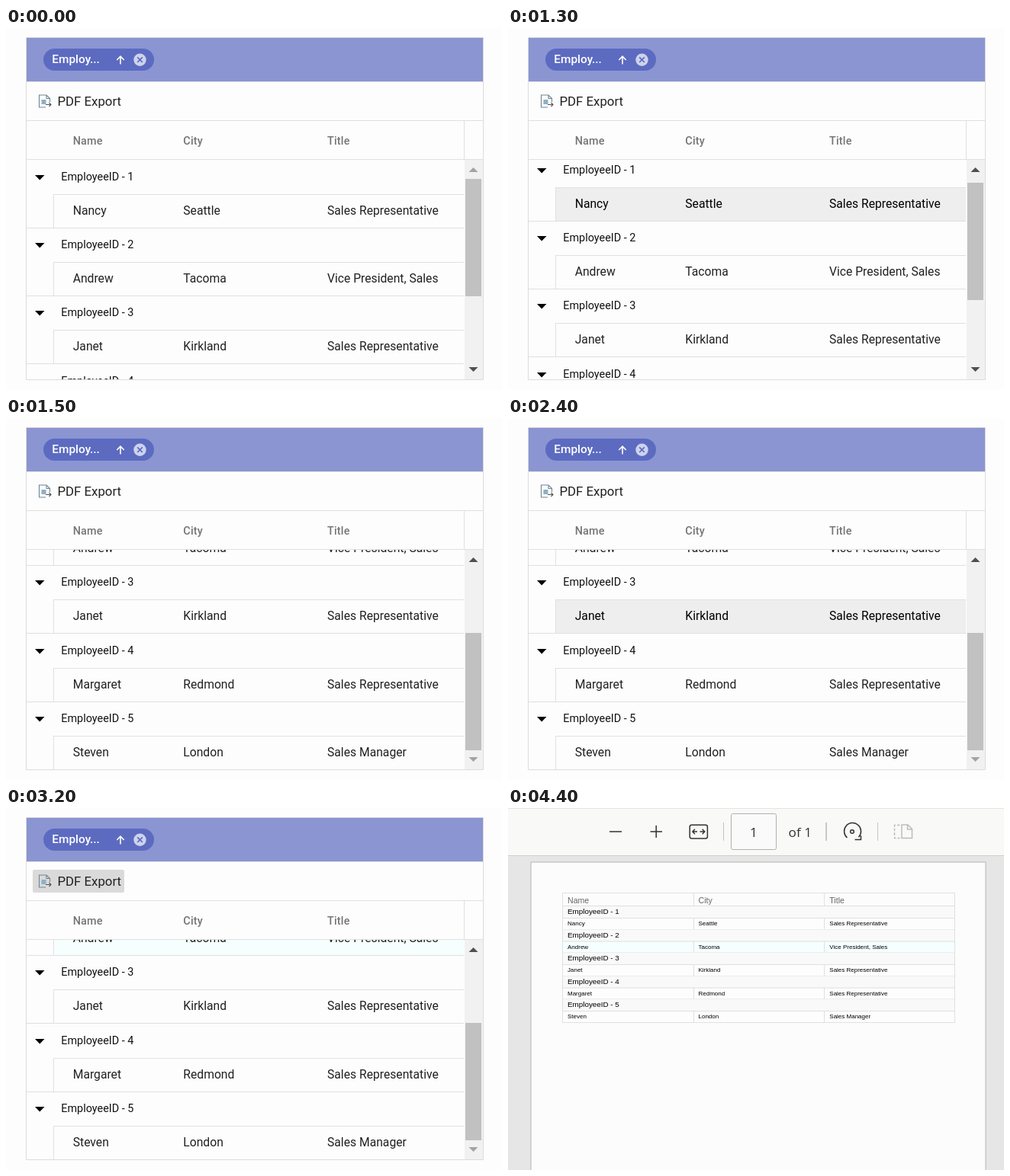
An HTML page for the animation above (6600 ms loop, 650 px wide and 475 px high).

```html
<!DOCTYPE html>
<html lang="en">
<head>
<meta charset="utf-8">
<title>Grid export</title>
<style>
html, body { margin: 0; width: 100%; height: 100%; overflow: hidden; background: #fdfdfd; }
svg { display: block; width: 100%; height: 100%; }
text { font-family: Roboto, sans-serif; white-space: pre; }
.cell { font-size: 15.7px; fill: #212121; }
.caption { font-size: 14.4px; fill: #111; }
.head { font-size: 14.4px; font-weight: 500; letter-spacing: .2px; fill: #757575; }
.tool { font-size: 16.8px; fill: #212121; }
.chip { font-size: 15.4px; font-weight: 500; fill: #fff; }
.hover .cell { fill: #000; }
.viewer text { font-family: "Liberation Sans", Arial, sans-serif; fill: #000; }
.viewer .bar { font: 17.2px "Open Sans", sans-serif; fill: #333; }
.viewer .pdfHead { font-size: 10.6px; fill: #666; }
.viewer .pdfCaption { font-size: 9.85px; }
.viewer .pdfCell { font-size: 8px; }
</style>
</head>
<body>
<svg id="stage" viewBox="0 0 650 475" preserveAspectRatio="none"></svg>
<script>
const LOOP = 6600;
const PITCH = 89.25;
const MAX_SCROLL = 158;
const heads = ['Name', 'City', 'Title'];
const staff = [
  ['Nancy', 'Seattle', 'Sales Representative'],
  ['Andrew', 'Tacoma', 'Vice President, Sales'],
  ['Janet', 'Kirkland', 'Sales Representative'],
  ['Margaret', 'Redmond', 'Sales Representative'],
  ['Steven', 'London', 'Sales Manager']
];

const rect = (x, y, w, h, fill, more = '') =>
  `<rect x="${x}" y="${y}" width="${w}" height="${h}" fill="${fill}" ${more}/>`;
const text = (x, y, cls, str, more = '') =>
  `<text x="${x}" y="${y}" class="${cls}" ${more}>${str}</text>`;
const path = (d, stroke, width = 1, more = '') =>
  `<path d="${d}" fill="none" stroke="${stroke}" stroke-width="${width}" ${more}/>`;
const solid = (d, fill, more = '') => `<path d="${d}" fill="${fill}" ${more}/>`;
const hline = (x, y, w, fill = '#e0e0e0') => rect(x, y, w, 1, fill);
const vline = (x, y, h, fill = '#e0e0e0') => rect(x, y, 1, h, fill);
const columns = (xs, y, cls, list) => list.map((s, i) => text(xs[i], y, cls, s)).join('');

const gridX = [87.7, 232.3, 421];

function gridRow(cells, i) {
  const dy = Math.floor(PITCH * i + .3);
  return `<g transform="translate(0 ${dy})">
    ${solid('M38 193H50.5L44.2 199.5Z', '#000')}
    ${text(72.3, 200, 'caption', `EmployeeID - ${i + 1}`)}
    <g class="row">
      ${rect(62, 219, 538, 43, 'none', 'class="fill"')}
      ${columns(gridX, 245, 'cell', cells)}
    </g>
    ${hline(62, 218, 538)}${vline(62, 218, 44)}${hline(27, 262, 573)}
  </g>`;
}

function gridView() {
  return `<g id="grid">
    ${rect(27, 13, 598, 57, '#8b95d2')}
    ${rect(49, 27, 145, 29, '#5c6bc0', 'rx="14.5"')}
    ${text(60.3, 46, 'chip', 'Employ...')}
    ${path('M150 47.5V37.5M145.3 42L150 37.2L154.7 42', '#fff', 1.6)}
    <circle cx="175.5" cy="41.7" r="8.2" fill="#ced3ec"/>
    ${path('M172.2 38.4L178.8 45M178.8 38.4L172.2 45', '#5c6bc0', 1.7)}
    ${rect(35, 81, 120, 30, 'none', 'id="button" rx="2"')}
    ${path('M57.5 97V92.5L53 88H43.5V104H52M53 88V92.5H57.5', '#6f8594', 1.1)}
    ${rect(46.5, 94, 6, 6, '#8fb0c4')}
    ${path('M52 100.5H59M56.5 98L59 100.5L56.5 103', '#555', 1.1)}
    ${text(67.5, 102, 'tool', 'PDF Export')}
    ${columns(gridX, 153, 'head', heads)}
    <g clip-path="url(#body)"><g id="rows">${staff.map(gridRow).join('')}</g></g>
    ${rect(601, 173, 24, 288, '#f1f1f1')}
    ${rect(602, 198, 21, 154, '#c1c1c1', 'id="thumb"')}
    ${solid('M606.5 189H618.5L612.5 183Z', '#505050', 'id="up"')}
    ${solid('M606.5 445H618.5L612.5 451Z', '#505050', 'id="down"')}
    ${hline(27, 70, 598)}${hline(27, 121, 598)}${hline(27, 172, 598)}
    ${vline(600, 122, 50)}
    ${path('M26.5 12.5H625.5V461.5H26.5Z', '#dcdcdc')}
  </g>`;
}

const pdfX = [78, 249.5, 421.3];

function pdfRow(cells, i) {
  const y = 30.5 * i;
  return `<g transform="translate(0 ${y})">
    ${rect(72, 129, 513, 15, '#f9f9f9')}
    ${rect(72, 145, 513, 14, i === 1 ? '#f6ffff' : '#fdfdfd')}
    ${text(78, 139, 'pdfCaption', `EmployeeID - ${i + 1}`)}
    ${columns(pdfX, 154.3, 'pdfCell', cells)}
    ${hline(71, 144, 515)}${hline(71, 159, 515)}
    ${vline(243, 144, 15)}${vline(414, 144, 15)}
  </g>`;
}

function pdfView() {
  const ink = '#333', pale = '#bdbdbd';
  return `<g id="pdf" class="viewer">
    ${rect(0, 0, 650, 475, '#e6e6e6')}
    ${rect(0, 0, 650, 62, '#f9f9f8')}
    ${hline(0, 0, 650, '#e4e4e4')}${hline(0, 62, 650, '#cecece')}
    ${path('M133 31H149M186.5 31H202M194.2 23V39', ink, 1.5)}
    ${rect(238.2, 22.2, 23.2, 17.8, 'none', `rx="2.5" stroke="${ink}" stroke-width="1.5"`)}
    ${path('M241.8 31H248M251.5 31H257.8M245 27.7L241.8 31L245 34.3M254.6 27.7L257.8 31L254.6 34.3', ink, 1.4)}
    ${vline(282, 19, 24, '#c4c4c4')}${vline(416.5, 19, 24, '#999')}${vline(484, 19, 24, '#c4c4c4')}
    ${rect(292.5, 7.5, 59, 47, '#fafafa', 'rx="2" stroke="#b0b0b0"')}
    ${text(322, 38, 'bar', '1', 'text-anchor="middle"')}
    ${text(367.5, 38, 'bar', 'of 1')}
    ${path('M444.5 39A11 11 0 1 1 459.5 38.2M462.5 36.3V41.5H454.5', ink, 1.5)}
    <circle cx="451" cy="31" r="2.3" fill="none" stroke="${ink}" stroke-width="1.5"/>
    ${path('M516 22H524L529.5 27.5V39.5H516ZM523.5 22V28H529.5', pale, 1.5)}
    ${path('M513.5 22.5H506.5V39.5H513.5', pale, 1.5, 'stroke-dasharray="3.6 2"')}
    ${rect(30, 71, 596, 410, '#fcfcfc', 'stroke="#c8c8c8" stroke-width="1.5"')}
    ${columns(pdfX, 125, 'pdfHead', heads)}
    ${staff.map(pdfRow).join('')}
    ${hline(71, 111, 515)}${hline(71, 128, 515)}
    ${vline(71, 111, 171)}${vline(585, 111, 171)}
    ${vline(243, 111, 17)}${vline(414, 111, 17)}
  </g>`;
}

const $ = id => document.getElementById(id);
$('stage').innerHTML = `
  <defs><clipPath id="body"><rect x="27" y="173" width="573" height="288"/></clipPath></defs>
  ${rect(0, 0, 650, 475, '#fdfdfd')}${gridView()}${pdfView()}`;
const rows = [...document.querySelectorAll('.row')];

// Last value whose start time has passed.
const stepAt = (t, steps) => steps.reduce((v, [from, next]) => t >= from ? next : v, null);

const scrollSteps = [[0, 0], [1300, 9], [1400, 95], [1500, MAX_SCROLL]];
const hoverSteps = [[0, -1], [800, 0], [1500, -1], [2400, 2], [2500, -1], [2600, 1], [2700, -1]];
const buttonSteps = [[0, 'none'], [2900, '#dadada'], [3100, '#c8c8c8'], [3200, '#dadada'], [3800, 'none']];

function draw(t) {
  const scroll = stepAt(t, scrollSteps);
  const hover = stepAt(t, hoverSteps);
  const exported = t >= 4400;
  $('grid').style.display = exported ? 'none' : '';
  $('pdf').style.display = exported ? '' : 'none';
  $('rows').setAttribute('transform', `translate(0 ${-scroll})`);
  $('thumb').setAttribute('y', 198 + Math.round(scroll * 84 / MAX_SCROLL));
  $('up').setAttribute('fill', scroll > 0 ? '#505050' : '#a3a3a3');
  $('down').setAttribute('fill', scroll < MAX_SCROLL ? '#505050' : '#a3a3a3');
  $('button').setAttribute('fill', stepAt(t, buttonSteps));
  rows.forEach((row, i) => {
    const rest = i === 1 && t >= 2700 ? '#f6fffe' : 'none';
    row.classList.toggle('hover', i === hover);
    row.querySelector('.fill').setAttribute('fill', i === hover ? '#eee' : rest);
  });
}

const start = performance.now();
function tick() {
  draw((performance.now() - start) % LOOP);
  requestAnimationFrame(tick);
}
tick();
</script>
</body>
</html>
```
